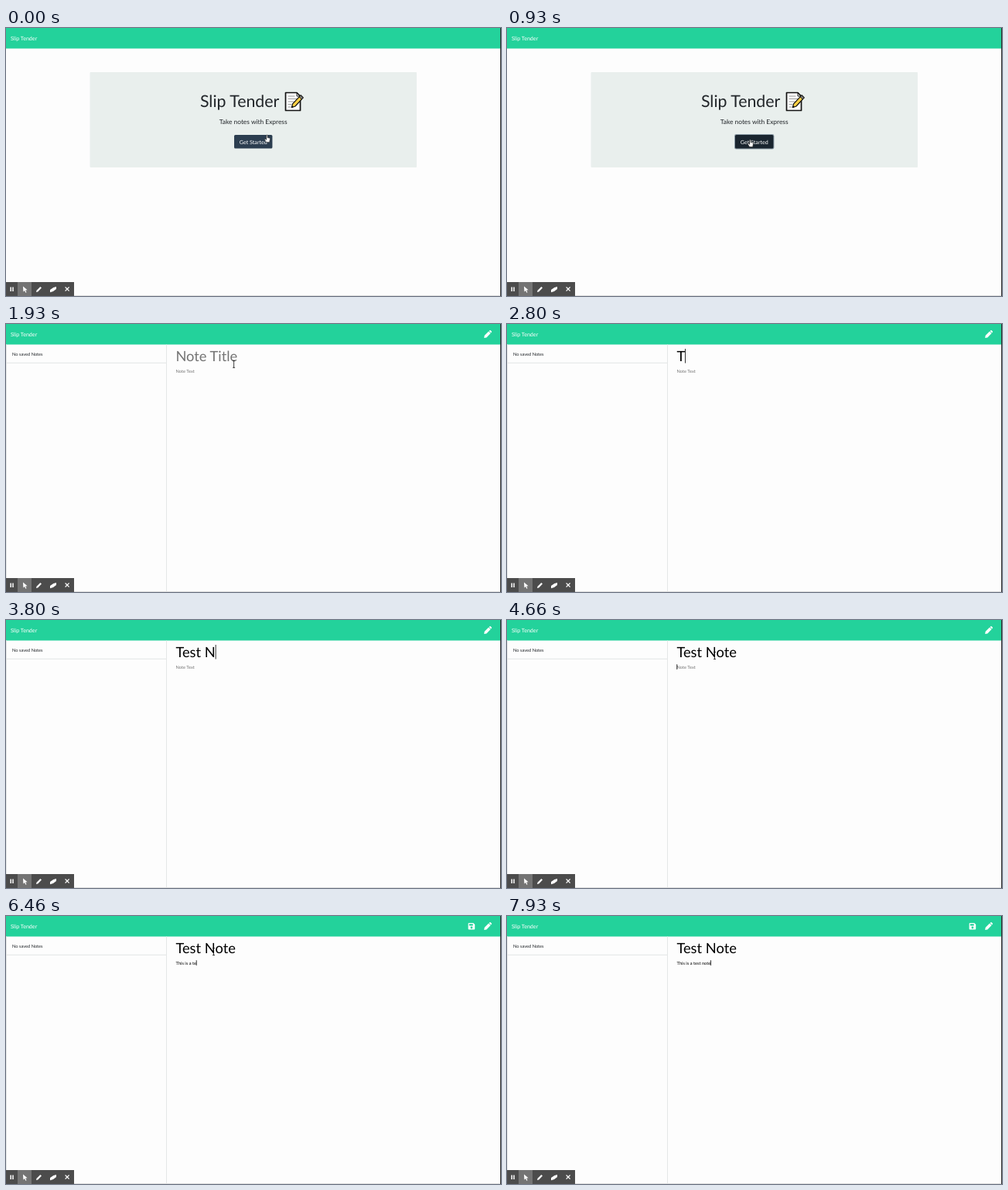
These frames come from a looping animation (640x346 px, 8 s). An HTML page:

```html
<!DOCTYPE html>
<html lang="en">
<head>
<meta charset="utf-8">
<title>Slip Tender</title>
<style>
  html, body { margin: 0; width: 100%; height: 100%; overflow: hidden; background: #fdfdfd; }
  svg { display: block; width: 640px; height: 346px; }
  text { font-family: Lato, sans-serif; text-rendering: geometricPrecision; white-space: pre; }
  .mid { text-anchor: middle; }
  .brand { font-size: 7.13px; fill: #fff; }
  .title { font-size: 18.3px; }
  .small { font-size: 5.7px; }
  .hint { fill: #747474; }
  .ink { fill: #212529; }
</style>
</head>
<body>
<svg viewBox="0 0 640 346">
  <rect width="640" height="346" fill="#fdfdfd"/>
  <rect width="640" height="26.5" fill="#23d29b"/>
  <text class="brand" x="6" y="15.9">Slip Tender</text>

  <g id="home">
    <rect x="108.5" y="57" width="422.5" height="123" rx="1" fill="#e9efed"/>
    <text class="ink" x="251" y="102" font-size="21.3">Slip Tender</text>
    <g stroke-linejoin="round" stroke-linecap="round">
      <path d="M361.5 83.5H376L380.5 88V106.5H361.5Z" fill="#fff" stroke="#111" stroke-width="1.7"/>
      <path d="M376 83.5V88H380.5" fill="none" stroke="#111"/>
      <path d="M365 88H373M365 91.5H376M365 95H372M365 98.5H369M365 102H368" stroke="#999" stroke-width="1.2"/>
      <path d="M369.3 102.6L370.6 97.8L381 86.8L384.2 89.9L374 101Z" fill="#fcd045" stroke="#111" stroke-width="1.2"/>
      <path d="M379.3 88.7L381 86.8L384.2 89.9L382.4 91.8Z" fill="#777" stroke="#111" stroke-width=".8"/>
      <path d="M369.3 102.6L370 100.2L371.7 102Z" fill="#111"/>
    </g>
    <text class="ink mid" x="319.7" y="123.7" font-size="8.4">Take notes with Express</text>
    <rect id="ring" x="294" y="137" width="51.4" height="19.6" rx="2.4" fill="#8b9ba6"/>
    <rect id="button" x="295" y="138" width="49.4" height="17.6" rx="1.6"/>
    <text class="mid" x="319.8" y="149.5" font-size="7.13" fill="#fff">Get Started</text>
  </g>

  <g id="notes">
    <path d="M.5 26.5V346M207.5 26.5V346" stroke="#e5e7e7"/>
    <g id="list">
      <path d="M0 50.2H207" stroke="#e2e4e4"/>
      <text class="small ink" x="8" y="40.6">No saved Notes</text>
    </g>
    <text id="title" class="title" x="219.4" y="47.8"></text>
    <text id="body" class="small" x="219.6" y="62.5"></text>
    <rect id="caret" width=".8" fill="#000"/>
    <path id="save" fill="#fff" fill-rule="evenodd" d="M598.6 9H604.2L606.2 11V16.6Q606.2 17.6 605.2 17.6H598.6Q597.6 17.6 597.6 16.6V10Q597.6 9 598.6 9ZM598.8 10.2V12.6H603.7V10.2ZM601.9 13.6A1.4 1.4 0 1 0 601.9 16.4A1.4 1.4 0 1 0 601.9 13.6Z"/>
    <path fill="#fff" d="M618.1 17.9L618.7 14.8L624 9.5L626.6 12.1L621.3 17.4ZM624.5 9L625.4 8.2Q626 7.7 626.6 8.2L627.8 9.4Q628.3 10 627.8 10.6L627.1 11.5Z"/>
  </g>

  <path d="M0 345.5H640" stroke="#dedede"/>
  <path d="M639.5 0V346" stroke="#2b2b2b"/>

  <g id="toolbar">
    <rect y="328" width="88" height="18" fill="#4c4c4c"/>
    <rect x="15" y="328" width="18" height="18" fill="#747474"/>
    <path d="M6.2 334.5V340M9 334.5V340" stroke="#fff" stroke-width="1.5"/>
    <path d="M22 333.5L27.6 338.2L25.2 338.5L26.5 341.2L25.4 341.7L24.1 339L22.4 340.6Z" fill="#fff"/>
    <path d="M39 341L39.6 338.8L44.4 334L46 335.6L41.2 340.4Z" fill="#fff"/>
    <path d="M57 338L61.4 335L65 334V337L61 340L57 341.3Z" fill="#fff"/>
    <path d="M76.6 334.5L81.6 339.5M81.6 334.5L76.6 339.5" stroke="#fff" stroke-width="1.1"/>
  </g>

  <path id="hand" fill="#fff" stroke="#222" stroke-width=".6" stroke-linejoin="round"
    d="M-1.3 -4.6Q-.5 -5.2 .1 -4.5V-1.4L2.6 -.9Q3.5 -.6 3.4 .4L2.7 4.4H-1.4L-3.5 1.3Q-3.6 .1 -2.5 .4L-1.3 1.3Z"/>
  <path id="beam" fill="none" stroke="#111" stroke-width=".8" d="M-1.5 -4.5H1.5M0 -4.5V4.5M-1.5 4.5H1.5"/>
  <path id="arrow" fill="#111" stroke="#fff" stroke-width=".5" d="M0 0L5 5.2L2.8 5.4L4 8L2.9 8.5L1.7 5.9L0 7.4Z"/>
</svg>
<script>
const LOOP = 8000, BLINK = 600;
const OPEN = 1000, FOCUS_TITLE = 2400, FOCUS_BODY = 4600;
const TITLE = "Test Note", BODY = "This is a test note";
const titleKeys = [2800, 3000, 3200, 3400, 3530, 3800, 3930, 4130, 4330];
const bodyKeys = [...BODY].map((_, i) => 4930 + i * 139);

const el = id => document.getElementById(id);
const show = (id, on) => { el(id).style.display = on ? "" : "none"; };
const clamp = x => Math.min(1, Math.max(0, x));
const ease = x => x * x * (3 - 2 * x);
const span = (t, from, to) => clamp((t - from) / (to - from));
const mix = (a, b, k) => a + (b - a) * k;
const pen = document.createElement("canvas").getContext("2d");

function place(id, on, x, y) {
  show(id, on);
  if (on) el(id).setAttribute("transform", `translate(${x} ${y})`);
}

function type(id, text, keys, hint, t) {
  const count = keys.filter(k => k <= t).length;
  el(id).textContent = count ? text.slice(0, count) : hint;
  el(id).classList.toggle("hint", !count);
  return count;
}

function drawCaret(t, titleCount, bodyCount) {
  const inBody = t >= FOCUS_BODY;
  const count = inBody ? bodyCount : titleCount;
  const keys = inBody ? bodyKeys : titleKeys;
  const since = count ? keys[count - 1] : inBody ? FOCUS_BODY : FOCUS_TITLE;
  const on = t >= FOCUS_TITLE && Math.floor((t - since) / BLINK) % 2 === 0;
  show("caret", on);
  if (!on) return;
  pen.font = `${inBody ? 5.7 : 18.3}px Lato, sans-serif`;
  const width = pen.measureText((inBody ? BODY : TITLE).slice(0, count)).width;
  const caret = el("caret");
  caret.setAttribute("x", 219.4 + width);
  caret.setAttribute("y", inBody ? 57.2 : 32);
  caret.setAttribute("height", inBody ? 6.6 : 18.5);
}

function drawPointer(t) {
  const press = ease(span(t, 60, 800));
  place("hand", t < OPEN, mix(338, 315, press), mix(143, 149, press));

  const enter = ease(span(t, 1860, 2130));
  const inTitle = (t >= 1860 && t < 2800) || (t >= FOCUS_BODY && t < 7760);
  place("beam", inTitle, mix(300, 268.5, enter), mix(53, 46, enter));

  const leave = ease(span(t, 7700, 7930));
  place("arrow", t >= 7760 && t < 7930, mix(268, 600, leave), mix(43, 12, leave));
}

function draw(t) {
  show("home", t < OPEN);
  show("notes", t >= OPEN);
  show("list", t >= 1060);

  // hover darkens the button, pressing adds the ring
  const hover = span(t, 60, 210), pressed = t >= 860;
  const shade = pressed ? [26, 37, 47] : [mix(44, 30, hover), mix(62, 43, hover), mix(80, 55, hover)];
  el("button").setAttribute("fill", `rgb(${shade})`);
  show("ring", pressed);

  const titleCount = type("title", TITLE, titleKeys, "Note Title", t);
  const bodyCount = type("body", BODY, bodyKeys, "Note Text", t);
  show("save", titleCount && bodyCount);
  drawCaret(t, titleCount, bodyCount);
  drawPointer(t);
}

const start = performance.now();
function tick() {
  draw((performance.now() - start) % LOOP);
  requestAnimationFrame(tick);
}
tick();
</script>
</body>
</html>
```
